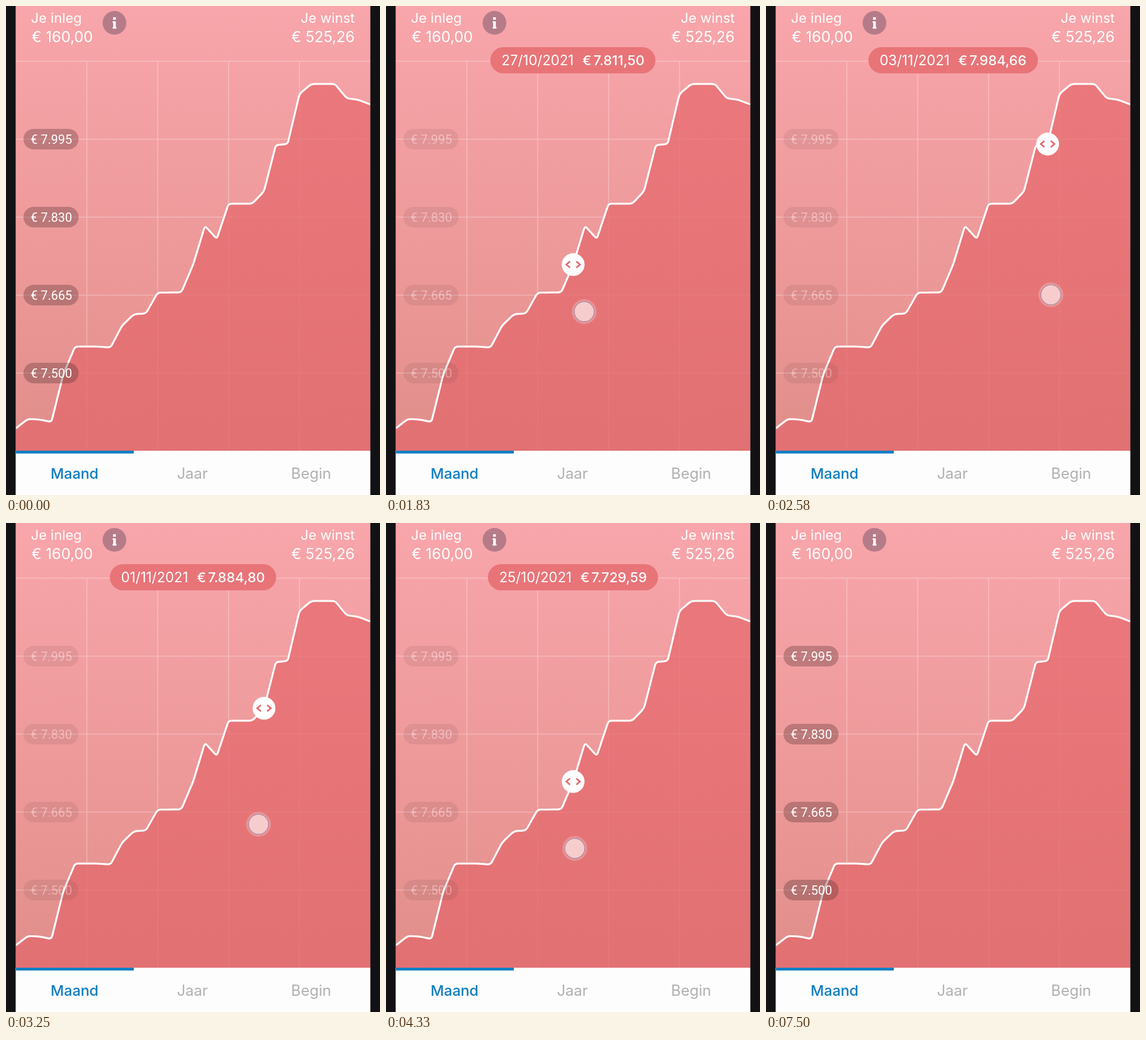
These frames come from a looping animation (600x784 px, 8 s). An HTML page:

```html
<!DOCTYPE html>
<html lang="nl">
<head>
<meta charset="utf-8">
<title>Beleggen</title>
<style>
  html, body { margin: 0; width: 100%; height: 100%; overflow: hidden; background: #121214; }
  #stage { position: relative; width: 600px; height: 784px; overflow: hidden; }
  svg { position: absolute; left: 0; top: 0; display: block; }
  text { font-family: Inter, Roboto, sans-serif; font-size: 24px; fill: #fff; }
  .small { font-size: 22px; }
  .axis { font-family: Roboto, sans-serif; font-size: 20px; }
  .tab { fill: #b0b0b1; text-anchor: middle; }
  .tab.on { fill: #0f7dc0; font-weight: 500; font-size: 23.5px; }
  .end { text-anchor: end; }
  #tip {
    position: absolute; left: 300px; top: 66px; height: 41.5px; padding: 0 18px;
    transform: translateX(-50%); display: flex; align-items: center; gap: 14px;
    border-radius: 21px; background: #e87478; color: #fff; white-space: nowrap;
    font: 22.3px Inter, Roboto, sans-serif;
  }
  #value { font-weight: 500; font-size: 22px; word-spacing: -3px; }
</style>
</head>
<body>
<div id="stage">
  <svg width="600" height="784" viewBox="0 0 600 784">
    <defs>
      <linearGradient id="sky" x1="0" y1="0" x2="0" y2="1">
        <stop offset="0" stop-color="#f8a6ab"/>
        <stop offset=".2" stop-color="#f4a1a5"/>
        <stop offset=".6" stop-color="#ec9898"/>
        <stop offset="1" stop-color="#e08e8a"/>
      </linearGradient>
      <linearGradient id="fill" gradientUnits="userSpaceOnUse" x1="0" y1="125" x2="0" y2="713">
        <stop offset="0" stop-color="#e76b6f"/>
        <stop offset="1" stop-color="#e2686c"/>
      </linearGradient>
      <radialGradient id="glow">
        <stop offset=".7" stop-color="#fff" stop-opacity=".55"/>
        <stop offset="1" stop-color="#fff" stop-opacity="0"/>
      </radialGradient>
    </defs>
    <rect x="15" width="571" height="713" fill="url(#sky)"/>
    <path id="grid" fill="none" stroke="#fff" stroke-opacity=".28" stroke-width="1.6"/>
    <path id="area" fill="url(#fill)" fill-opacity=".77"/>
    <path id="line" fill="none" stroke="#fff" stroke-width="3" stroke-linejoin="round"/>
    <g id="axis"></g>

    <text class="small" x="40" y="27">Je inleg</text>
    <text x="41" y="58">€ 160,00</text>
    <text class="small end" x="559.5" y="27">Je winst</text>
    <text class="end" x="559.5" y="58">€ 525,26</text>
    <circle cx="174" cy="27" r="19" fill="#b67b89"/>
    <path d="M171.8 18h4.4v4h-4.4zM171 24.5h5.2v9.2h1v2.6h-6.2v-2.6h1v-6.6h-1z" fill="#fff"/>

    <rect x="15" y="713" width="571" height="71" fill="#fdfdfe"/>
    <rect x="16" y="713" width="189" height="4.5" fill="#0f7dc3"/>
    <text class="tab on" x="110" y="758">Maand</text>
    <text class="tab" x="299" y="758">Jaar</text>
    <text class="tab" x="489.5" y="758">Begin</text>
    <path d="M0 0h15.5v784H0zM584.5 0H600v784h-15.5z" fill="#121214"/>

    <g id="handle">
      <circle r="18.3" fill="#fff"/>
      <path id="arrows" d="M-5 -5l-6 5l6 5M5 -5l6 5l-6 5" fill="none" stroke="#e2686d" stroke-width="2.5"/>
    </g>
    <g id="finger">
      <circle r="21" fill="url(#glow)"/>
      <circle r="16.2" fill="#f6cccd" stroke="#b58a9c" stroke-width="1.6"/>
    </g>
  </svg>
  <div id="tip"><span id="date"></span><span id="value"></span></div>
</div>
<script>
const LOOP = 8000, FPS = 12;
const X0 = 16, STEP = 568.5 / 30;
const DOWN = 16, UP = 54, GONE = 90;
const values = [
  7383.2, 7402.8, 7401.6, 7396.4, 7496.7, 7556.1, 7556.1, 7556.1, 7553.9, 7601,
  7624.73, 7626.1, 7670.4, 7670.4, 7670.9, 7729.59, 7811.5, 7783.8, 7858.4, 7858.4,
  7858.4, 7884.8, 7982.5, 7984.66, 8090.7, 8111.8, 8111.8, 8111.8, 8081.5, 8078.2, 8068.3
];
// step, x, y, easing power (0 = sine in and out)
const touch = [
  [16, 212, 504, 1], [22, 318, 490, 1], [31, 457, 463, 1.3],
  [34, 457, 463, 1], [46, 317, 517, 0], [53, 302, 522, 1.5]
];

const $ = id => document.getElementById(id);
const clamp = v => Math.max(0, Math.min(1, v));
const px = i => X0 + i * STEP;
const py = v => 588.5 - (v - 7500) / 1.32;
const money = v => '€ ' + v.toFixed(2).replace('.', ',').replace(/^(\d)/, '$1.');

function roundedPath(pts, r) {
  const toward = (a, b) => {
    const k = r / Math.hypot(b[0] - a[0], b[1] - a[1]);
    return [a[0] + (b[0] - a[0]) * k, a[1] + (b[1] - a[1]) * k];
  };
  let d = 'M' + pts[0];
  for (let i = 1; i < pts.length - 1; i++)
    d += 'L' + toward(pts[i], pts[i - 1]) + 'Q' + pts[i] + ' ' + toward(pts[i], pts[i + 1]);
  return d + 'L' + pts[pts.length - 1];
}

function buildChart() {
  const d = roundedPath(values.map((v, i) => [px(i), py(v)]), 5);
  $('line').setAttribute('d', d);
  $('area').setAttribute('d', d + 'V713H' + X0 + 'Z');
  let grid = '';
  for (let i = 0; i < 5; i++) grid += `M16 ${88.5 + 125 * i}H584.5`;
  for (let i = 6; i < 30; i += 6) grid += `M${px(i)} 88V713`;
  $('grid').setAttribute('d', grid);
  $('axis').innerHTML = ['7.995', '7.830', '7.665', '7.500'].map((s, i) =>
    `<g transform="translate(28 ${197 + 125 * i})">
      <rect width="88.5" height="33" rx="16.5" fill="#5a3232" fill-opacity=".34"/>
      <text class="axis" x="11.5" y="23.5">€ ${s}</text></g>`).join('');
}

function fingerAt(k) {
  let i = 1;
  while (i < touch.length - 1 && k > touch[i][0]) i++;
  const a = touch[i - 1], b = touch[i];
  const u = clamp((k - a[0]) / (b[0] - a[0]));
  const e = b[3] ? 1 - (1 - u) ** b[3] : (1 - Math.cos(Math.PI * u)) / 2;
  return [a[1] + (b[1] - a[1]) * e, a[2] + (b[2] - a[2]) * e];
}

const indexAt = k => Math.round((fingerAt(k)[0] - X0) / STEP);

function dateOf(i) {
  const d = new Date(Date.UTC(2021, 9, i + (i > 15 ? 11 : 10)));
  const two = n => String(n).padStart(2, '0');
  return `${two(d.getUTCDate())}/${two(d.getUTCMonth() + 1)}/2021`;
}

function place(id, x, y, opacity) {
  $(id).setAttribute('transform', `translate(${x} ${y})`);
  $(id).setAttribute('opacity', opacity);
}

function draw(t) {
  const k = Math.floor((t + 5) * FPS / 1000);
  const shown = k >= DOWN && k < GONE;
  const first = k === DOWN;

  const dim = Math.min(clamp((k - DOWN) / 4), 1 - clamp((k - UP) / 4));
  $('axis').setAttribute('opacity', 1 - 0.7 * dim);

  const [fx, fy] = fingerAt(k);
  const press = k < DOWN ? 0 : first ? 0.65 : 1 - clamp((k - UP + 1) / 4);
  place('finger', fx, fy, press);

  // the handle trails the touch by one step
  const h = indexAt(Math.max(DOWN, k - 1));
  place('handle', px(h), py(values[h]), shown ? (first ? 0.93 : 1) : 0);
  $('arrows').setAttribute('opacity', first ? 0.4 : 1);

  const i = indexAt(k);
  $('tip').style.visibility = shown ? 'visible' : 'hidden';
  $('tip').style.color = first ? 'rgba(255,255,255,.8)' : '#fff';
  $('date').textContent = dateOf(i);
  $('value').textContent = money(values[i]);
}

buildChart();
const start = performance.now();
function tick() {
  draw((performance.now() - start) % LOOP);
  requestAnimationFrame(tick);
}
tick();
</script>
</body>
</html>
```
